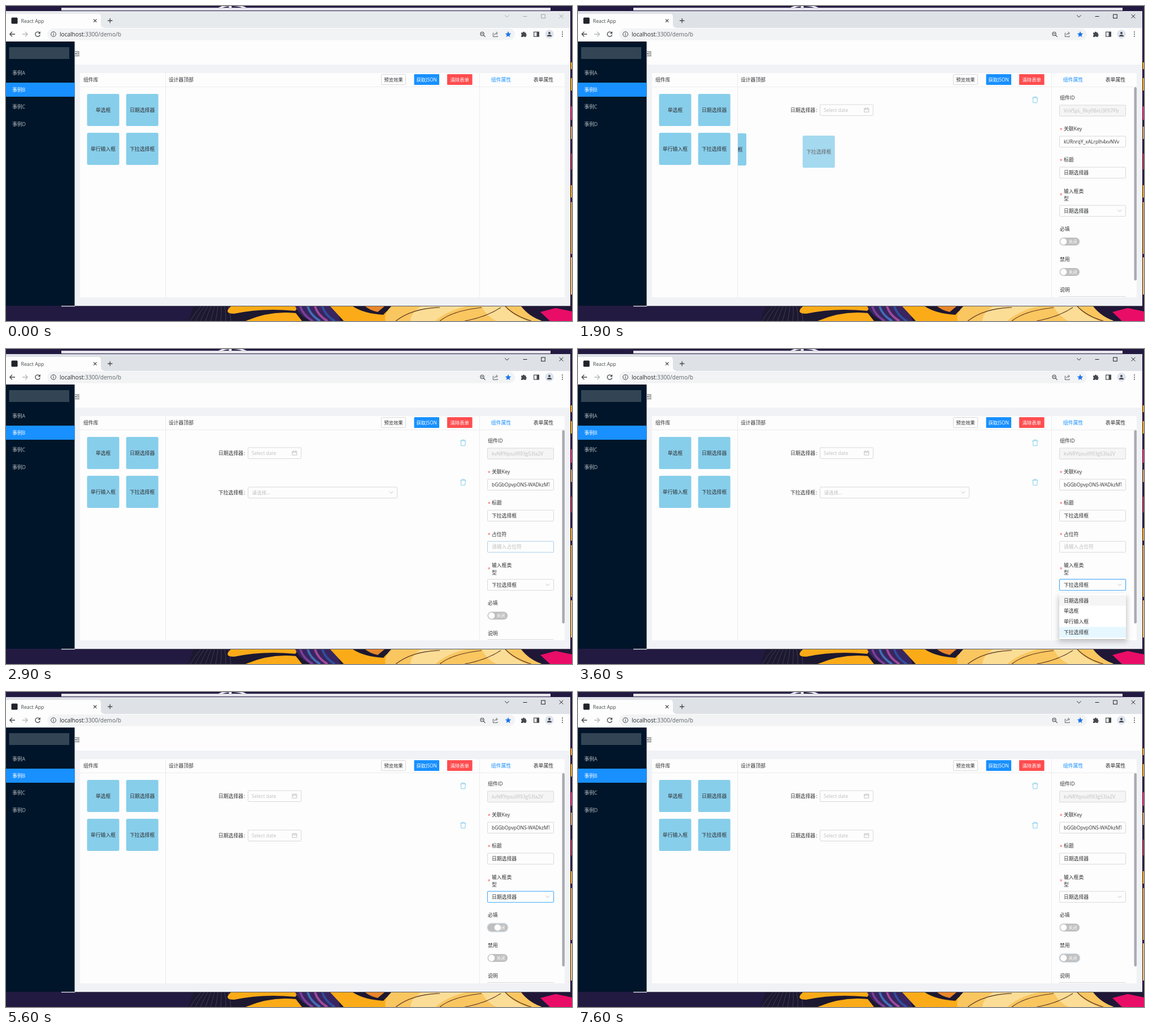
These frames come from a looping animation (1002x559 px, 8 s). An HTML page:

```html
<!DOCTYPE html>
<html lang="zh-CN">
<head>
<meta charset="utf-8">
<title>Form designer</title>
<style>
html, body { margin: 0; width: 100%; height: 100%; overflow: hidden; background: #231a42; }
svg { display: block; width: 1002px; height: 559px; }
text { font-family: "Open Sans", "Noto Sans CJK SC", "Noto Sans CJK", sans-serif; white-space: pre; }
</style>
</head>
<body>
<svg viewBox="0 0 1002 559" xmlns="http://www.w3.org/2000/svg">
  <defs>
    <clipPath id="canvas"><rect x="283" y="144" width="555" height="373"/></clipPath>
    <clipPath id="panel"><rect x="839" y="144" width="151" height="373"/></clipPath>
    <clipPath id="field"><rect x="856" y="170" width="106" height="340"/></clipPath>
    <clipPath id="page"><rect x="122" y="63" width="877" height="469"/></clipPath>
    <filter id="soft" x="-30%" y="-40%" width="160%" height="180%"><feGaussianBlur stdDeviation="5"/></filter>
  </defs>
  <g id="back"></g>
  <g id="live"></g>
</svg>
<script>
const LOOP = 8000, STEP = 100;
const BLUE = '#1890ff', SKY = '#87ceeb', INK = '#303133', PALE = '#bfbfbf', EDGE = '#d9d9d9', WHITE = '#fdfdfd';
const DATE = '日期选择器', PICK = '下拉选择框', LINE = '单行输入框', RADIO = '单选框';

const clamp = v => Math.max(0, Math.min(1, v));
const span = (t, a, b) => clamp((t - a) / (b - a));
const mix = (a, b, k) => a + (b - a) * k;
const rect = (x, y, w, h, fill, more = '') =>
  `<rect x="${x}" y="${y}" width="${w}" height="${h}" fill="${fill}" ${more}/>`;
const box = (x, y, w, h, fill = WHITE, edge = EDGE, rx = 1.2) =>
  rect(x + .5, y + .5, w, h, fill, `stroke="${edge}" rx="${rx}"`);
const path = (d, stroke, width = 1, fill = 'none') =>
  `<path d="${d}" stroke="${stroke}" stroke-width="${width}" fill="${fill}"/>`;
const shape = (d, fill) => `<path d="${d}" fill="${fill}"/>`;
const disc = (x, y, r, fill, more = '') => `<circle cx="${x}" cy="${y}" r="${r}" fill="${fill}" ${more}/>`;
// y is the optical middle of the line
const text = (s, x, y, fill = INK, size = 8.8, anchor = 'start') =>
  `<text x="${x}" y="${y + size * .37}" font-size="${size}" fill="${fill}" text-anchor="${anchor}">${s}</text>`;
const group = (body, more) => `<g ${more}>${body}</g>`;
const tile = (s, x, y, alpha = 1) =>
  group(rect(x, y, 57, 57, SKY, 'rx="2.5"') + text(s, x + 28.5, y + 28.8, INK, 8.9, 'middle'), `opacity="${alpha}"`);

function wallpaper() {
  let s = rect(0, 0, 1002, 559, '#231a42');
  s += path('M375 5Q400 -8 427 5', '#e9e6ee', 3) + path('M397 0v4', '#e9e6ee', 5);
  s += rect(98, 3, 866, 5, '#e4e3ea');
  // lower strip
  s += shape('M323 559L332 533H600V559Z', '#1c1830');
  for (let i = 0; i < 9; i++) s += path(`M${326 + i * 9} 559Q${334 + i * 8} 545 ${345 + i * 6} 533`, '#4a4560', .8);
  s += shape('M398 533H518L512 541Q455 535 404 546Q384 546 398 533Z', '#fbab18');
  s += shape('M424 559Q468 540 513 545L524 559Z', '#fbab18');
  s += shape('M512 533H584L592 559H540Q520 550 512 533Z', '#39255f');
  ['#7b3f98', '#3f6fb5', '#a04a9c', '#2f4f9c'].forEach((c, i) => {
    s += path(`M${521 + i * 13} 533Q${526 + i * 13} 549 ${543 + i * 13} 559`, c, 4);
  });
  s += shape('M574 533H690L680 559H598Z', '#fbab18');
  s += shape('M614 533H688Q676 538 668 548Q634 546 614 533Z', '#1d1830');
  s += shape('M636 533H670L658 543Q644 540 636 533Z', '#e8862a');
  s += shape('M682 533H920L948 559H672Q668 546 682 533Z', '#f9c660');
  s += shape('M735 533H815Q780 541 760 559H716Q716 545 735 533Z', '#fbdd96');
  s += shape('M842 533H885Q893 548 922 559H868Q850 550 842 533Z', '#fbdd96');
  s += path('M690 559Q720 536 768 535M768 559Q790 541 842 535M812 559Q850 552 876 535M884 533Q900 550 930 559', '#5a3420', 1.2);
  s += shape('M912 533H1002V559H950Q927 552 912 533Z', '#201737');
  s += shape('M946 543L973 536L1002 542V559H963Z', '#e90d67');
  // right edge
  s += rect(999, 9, 3, 524, '#2a1c40');
  [[100, 12, '#fbab18'], [128, 22, '#fbab18'], [178, 24, '#e8337a'], [214, 22, '#d9a067'], [262, 28, '#b5304f'],
    [318, 22, '#fbab18'], [348, 92, '#e6a53a'], [446, 66, '#fbc96a']].forEach(([y, h, c]) => s += rect(1000, y, 2, h, c));
  return s;
}

function toolbar() {
  const dark = '#45494d';
  let s = rect(0, 38, 999, 25, WHITE) + rect(73, 40, 828, 20.5, '#f1f3f4', 'rx="10"');
  s += path('M16 50H7M11 45.8L6.8 50L11 54.2', dark, 1.3);
  s += path('M29 50H38M34 45.8L38.2 50L34 54.2', '#b5b8bb', 1.3);
  s += path('M59.4 47.4A4.2 4.2 0 1 0 60.2 51', dark, 1.3) + shape('M60.8 45V49.2H56.6Z', dark);
  s += disc(84, 50, 4.4, 'none', `stroke="${dark}"`) + path('M84 49.3V52.6M84 47.3V48.4', dark, 1.1);
  s += text('localhost<tspan fill="#5f6368">:3300/demo/b</tspan>', 95, 50, '#27292c', 10.1);
  s += disc(843, 49.4, 3.1, 'none', `stroke="${dark}" stroke-width="1.1"`) + path('M845.3 51.7L848.5 54.9M841.5 49.4H844.5', dark, 1.1);
  s += path('M863.5 48H862.3V54.5H870V52.5M864.5 52Q865 48.3 869 48.3M867.5 45.8L870.4 48.3L867.5 50.8', '#5f6368');
  s += shape('M889 44.8L890.5 48.4L894.3 48.7L891.4 51.2L892.3 55L889 53L885.7 55L886.6 51.2L883.7 48.7L887.5 48.4Z', '#1a73e8');
  s += shape('M912 47.2H914.8A1.7 1.7 0 0 1 918.2 47.2H920.5V49.8A1.7 1.7 0 0 1 920.5 53V55H917.8A1.6 1.6 0 0 0 914.8 55H912V52.4A1.6 1.6 0 0 0 912 49.5Z', dark);
  s += rect(934.6, 46.1, 8.8, 8, 'none', `stroke="${dark}" stroke-width="1.2"`) + rect(939.5, 46, 4, 8, dark);
  s += disc(962, 50, 7.7, '#dde3ee') + disc(962, 47.9, 2, dark) + shape('M957.8 54Q958 50.9 962 50.9T966.2 54Z', dark);
  [46.2, 50, 53.8].forEach(y => s += disc(985, y, 1, dark));
  return s;
}

function app() {
  let s = rect(121, 63, 878, 469, '#f0f2f5') + rect(121, 63, 878, 41, WHITE);
  s += path('M122 81H130M125.5 83.5H130M125.5 86H130M122 88.5H130', '#444', .9) + shape('M122 84.7L124.5 82.7V86.7Z', '#444');
  s += rect(0, 63, 121.5, 469, '#001529') + rect(5.5, 73, 106.5, 21, '#334454');
  s += rect(0, 136, 121.5, 25, BLUE);
  ['A', 'B', 'C', 'D'].forEach((c, i) => s += text('事例' + c, 11, 118.6 + i * 30.3, i === 1 ? '#fff' : '#b3b9bf'));
  s += rect(98, 532, 24, 1.3, '#e4e3ea') + rect(122, 532, 877, 1, '#5a5866');
  s += rect(131, 119, 858, 398, WHITE);
  s += path('M131 143.5H989M282.5 119V517M838.5 119V517', '#ececee');
  s += text('组件库', 137, 131) + text('设计器顶部', 288, 131);
  s += box(664, 121, 43, 18) + text('预览效果', 686, 131, INK, 8.4, 'middle');
  s += rect(722.5, 121, 44.5, 19, BLUE, 'rx="1"') + text('获取JSON', 744.7, 131, '#fff', 8.4, 'middle');
  s += rect(781, 121, 44.5, 19, '#ff4d4f', 'rx="1"') + text('清除表单', 803.2, 131, '#fff', 8.4, 'middle');
  s += text('组件属性', 876.4, 131, BLUE, 8.9, 'middle') + text('表单属性', 951.5, 131, INK, 8.9, 'middle');
  s += tile(RADIO, 143.5, 156) + tile(DATE, 212.7, 156) + tile(LINE, 143.5, 225) + tile(PICK, 212.7, 225);
  return s;
}

function tabs(active) {
  const ink = active ? '#202124' : '#a2a5a9';
  let s = rect(0, 9, 999, 30, active ? '#dee1e6' : '#e7eaed');
  s += shape('M0 14H163Q168 14 168 19V33Q168 38 173 38V39H0Z', WHITE);
  s += rect(9.5, 20.5, 11, 11, '#20232a', 'rx="1.5"') + text('React App', 26.5, 26.3, '#45494d', 8.75);
  s += path('M155 23.5L160.4 28.9M160.4 23.5L155 28.9', '#45494d', 1.1);
  s += path('M180 26H188.4M184.2 21.8V30.2', '#45494d', 1.3);
  s += path('M883.2 16.3L886.8 19.9L890.4 16.3M915.5 18.5H922.5M979.6 14.8L986.4 21.6M986.4 14.8L979.6 21.6', ink);
  return s + rect(947.7, 15, 6.6, 6.6, 'none', `stroke="${ink}"`);
}

const down = (x, y) => path(`M${x - 3.5} ${y - 1.8}L${x} ${y + 1.8}L${x + 3.5} ${y - 1.8}`, PALE, .9);
const trash = y => path(`M804 ${y - 3.5}H814.5M807 ${y - 3.5}V${y - 5.3}H811.5V${y - 3.5}M805.2 ${y - 3.5}L805.8 ${y + 5.2}H812.7L813.3 ${y - 3.5}`, SKY, 1);

function row(kind, y, must, off) {
  let s = text(kind, 376, y) + text(':', 421, y) + trash(y - 18);
  if (must) s += text('*', 369.3, y + .8, '#ff4d4f', 8.8);
  if (kind === PICK) return s + box(428, y - 10, 264, 19.5) + text('请选择...', 435.5, y, PALE, 8.5) + down(682, y);
  s += box(428, y - 10, 94, 19.5, off ? '#f5f5f5' : WHITE) + text('Select date', 435, y, PALE, 8.5);
  return s + path(`M506.8 ${y - 3}H514.8V${y + 3.7}H506.8ZM506.8 ${y - .8}H514.8M508.8 ${y - 4.4}V${y - 2}M512.8 ${y - 4.4}V${y - 2}`, PALE, .9);
}

function toggle(y, on, glow) {
  const tint = on > .5 ? BLUE : '#bfbfbf';
  let s = glow ? rect(851.2, y - 8.4, 38.2, 16.8, on > .5 ? '#1890ff' : '#8fb4cc', 'rx="8.4" opacity=".35"') : '';
  s += rect(852.5, y - 7, 35.5, 14, tint, 'rx="7"') + disc(mix(859.6, 881, on), y, 5.7, '#fff');
  return s + text(on > .5 ? '开启' : '关闭', on > .5 ? 865 : 876, y, '#fff', 7.8, 'middle');
}

function label(s, y, must) {
  return (must ? text('*', 852.8, y + 1.4, '#ff4d4f', 8.8) : '') + text(s, must ? 860 : 853, y);
}

function entry(y, value, ink = INK, fill = WHITE, edge = EDGE, size = 8.8) {
  return box(852, y - 10, 117, 19.5, fill, edge) + group(text(value, 860, y, ink, size), 'clip-path="url(#field)"');
}

function chooser(y, value, focus) {
  const ring = focus ? rect(851.3, y - 10.7, 119.4, 21.4, BLUE, `rx="2" opacity="${.2 * focus}"`) : '';
  return text('输入框类', 860, y - 35) + text('型', 860, y - 22) + text('*', 852.8, y - 27.4, '#ff4d4f') + ring +
    entry(y, value, INK, WHITE, focus > .4 ? '#40a9ff' : EDGE) + down(959, y);
}

function props(o) {
  let s = label('组件ID', 163) + entry(185.4, o.id, PALE, '#f5f5f5', EDGE, 8.5);
  s += label('关联Key', 218, true) + entry(240.5, o.key, INK, WHITE, EDGE, 8.5);
  s += label('标题', 273, true) + entry(295.5, o.kind);
  const pick = o.kind === PICK;
  if (pick) s += label('占位符', 328.5, true) + entry(350.8, '请输入占位符', PALE, WHITE, o.hover ? '#a9cdea' : EDGE);
  s += chooser(pick ? 418.3 : 363.3, o.kind, o.focus);
  const y = pick ? 55.2 : 0;
  s += label('必填', 396 + y) + toggle(418 + y, o.must, o.glow === 1);
  if (!pick) s += label('禁用', 449.5) + toggle(472, o.off, o.glow === 2);
  s += label('说明', pick ? 504.3 : 503.5) + box(852, 515, 117, 19);
  s += rect(984.5, 144, 4.5, 343, '#a9acb0', 'rx="2.2"');
  return group(s, 'clip-path="url(#panel)"');
}

function popup(top, k, hover) {
  let s = rect(850, top + 4, 122, 82, '#000', 'opacity=".2" filter="url(#soft)"') + rect(852, top, 118, 81, '#fff', 'rx="1.5"');
  [DATE, RADIO, LINE, PICK].forEach((name, i) => {
    const y = top + 3 + i * 18.8;
    const fill = i === 3 ? '#e6f7ff' : i === hover ? '#f5f5f5' : '#fff';
    s += rect(852, y, 118, 18.8, fill) + text(name, 860, y + 9.4);
  });
  const scale = mix(.8, 1, k);
  return group(group(s, `opacity="${k}" transform="translate(0 ${top * (1 - scale)}) scale(1 ${scale})"`), 'clip-path="url(#page)"');
}

function drag(t) {
  let slot = '', ghost = '';
  if (t >= 900 && t < 1300) {
    const k = span(t, 800, 1100);
    slot = tile(DATE, mix(242, 292.5, span(t, 900, 1100)), 156);
    if (t < 1200) ghost = tile(DATE, mix(212.7, 419.5, k), mix(156, 169.3, k), .75);
  }
  if (t >= 1900 && t < 2500) {
    slot = tile(PICK, mix(241, 295, span(t, 1900, 2000)), 226);
    if (t < 2100) ghost = tile(PICK, 397.7, 230, .75);
  }
  return group(slot, 'clip-path="url(#canvas)"') + ghost;
}

function scene(t) {
  let s = tabs(t >= 900);
  const picked = t >= 2100 && t < 4500;
  const must = span(t, 5500, 5700) - span(t, 6000, 6200);
  const off = span(t, 6600, 6800) - span(t, 7300, 7500);
  if (t >= 1300) {
    s += row(DATE, 184.5);
    if (t >= 2500) s += row(picked ? PICK : DATE, 254.5, must > .5, off > .5);
    const second = t >= 2100;
    s += props({
      id: second ? 'kvNRYqouiIfI93g53Ia2V' : 'VnV5pL_Rky08xU3Ffi7Pb',
      key: second ? 'bGGbOpvpONS-WADkzMTqe' : 'kURnrqY_xALrpIh4xvNVv',
      kind: picked ? PICK : DATE,
      hover: t >= 2700 && t < 3100,
      focus: span(t, 3000, 3300) - span(t, 5500, 5700),
      must, off,
      glow: t >= 5600 && t < 6700 ? 1 : t >= 6700 ? 2 : 0
    });
  }
  s += drag(t);
  const open = span(t, 3100, 3400) - span(t, 4300, 4600);
  if (open > 0) s += popup(picked ? 434 : 379, open, t >= 3600 ? 0 : -1);
  return s;
}

document.getElementById('back').innerHTML = wallpaper() + toolbar() + app();
const live = document.getElementById('live');
let last = -1;
function draw() {
  const t = Math.floor(performance.now() % LOOP / STEP) * STEP;
  if (t !== last) live.innerHTML = scene(last = t);
  requestAnimationFrame(draw);
}
draw();
</script>
</body>
</html>
```
